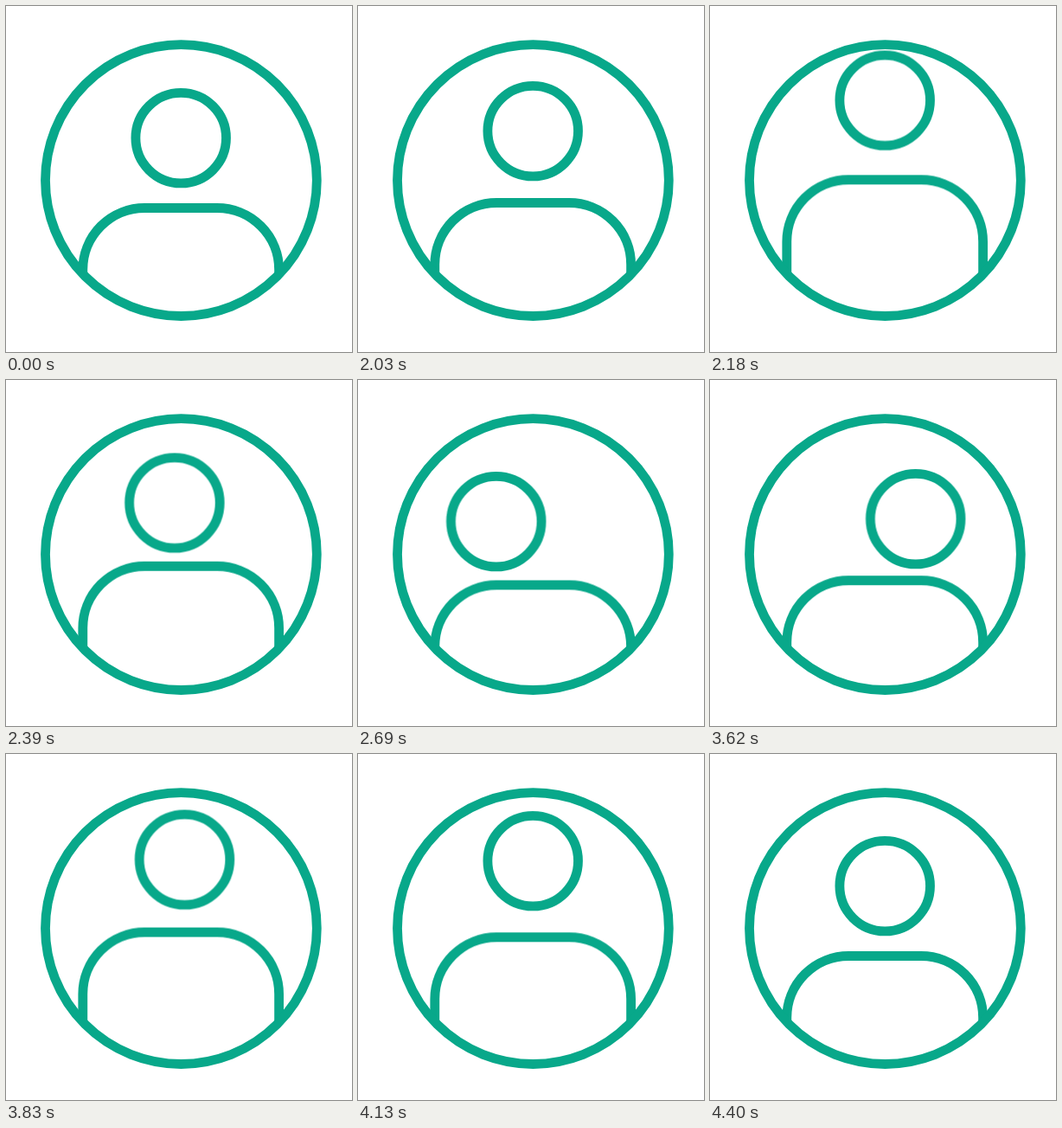
These frames come from a looping animation (400 px wide and 400 px high, 4.49 s). An HTML page:

```html
<!DOCTYPE html>
<html lang="en">
<head>
<meta charset="utf-8">
<title>Avatar</title>
<style>
  :root {
    --smooth: cubic-bezier(.333, 0, .667, 1);
    --swing: cubic-bezier(.5, 0, .5, 1);
  }
  html, body { margin: 0; width: 100%; height: 100%; overflow: hidden; background: #fff; }
  svg { display: block; width: 100%; height: 100%; }
  .line { fill: none; stroke: #08a88a; stroke-width: 10.8; }
  .head-x, .head-y, .body { animation: 4490ms linear infinite; }
  .head-x { animation-name: head-x; }
  .head-y { animation-name: head-y; }
  .body { animation-name: body; }

  /* Sideways: lean left, swing right, return to the middle */
  @keyframes head-x {
    0% { transform: translateX(0); }
    49.22% { transform: translateX(0); animation-timing-function: cubic-bezier(.53, 0, .4, 1); }
    62.58%, 66.59% { transform: translateX(-44.5px); }
    66.59% { animation-timing-function: var(--swing); }
    73.27%, 79.29% { transform: translateX(44.5px); }
    79.29% { animation-timing-function: var(--swing); }
    85.97%, 100% { transform: translateX(0); }
  }

  /* Up and down: hop, land, dip through the swing, hop back */
  @keyframes head-y {
    0% { transform: translateY(0); }
    44.54% { transform: translateY(0); animation-timing-function: var(--smooth); }
    49.22% { transform: translateY(-44px); animation-timing-function: cubic-bezier(.4, 0, .43, 1); }
    57.68% { transform: translateY(14px); animation-timing-function: ease; }
    62.58% { transform: translateY(10px); }
    66.59% { transform: translateY(10px); animation-timing-function: cubic-bezier(.5, 0, .7, 1); }
    69.93% { transform: translateY(19.6px); animation-timing-function: cubic-bezier(.3, 0, .5, 1); }
    73.27% { transform: translateY(10px); }
    79.29% { transform: translateY(10px); animation-timing-function: cubic-bezier(.4, 0, .35, 1); }
    90.31% { transform: translateY(-44px); animation-timing-function: var(--smooth); }
    98%, 100% { transform: translateY(0); }
  }

  @keyframes body {
    0% { transform: translateY(0); }
    44.54% { transform: translateY(0); animation-timing-function: var(--smooth); }
    49.22% { transform: translateY(-33px); animation-timing-function: cubic-bezier(.4, 0, .4, 1); }
    59.91% { transform: translateY(3.5px); }
    62.58% { transform: translateY(3px); }
    66.59% { transform: translateY(3px); animation-timing-function: cubic-bezier(.5, 0, .7, 1); }
    69.93% { transform: translateY(5.2px); animation-timing-function: cubic-bezier(.3, 0, .5, 1); }
    73.27% { transform: translateY(3px); }
    79.29% { transform: translateY(3px); animation-timing-function: var(--smooth); }
    90.31% { transform: translateY(-33px); animation-timing-function: var(--smooth); }
    98%, 100% { transform: translateY(0); }
  }
</style>
</head>
<body>
<svg viewBox="0 0 400 400">
  <clipPath id="inside"><circle cx="202.4" cy="201.6" r="159"/></clipPath>
  <g clip-path="url(#inside)">
    <path class="line body" d="M88.8 400V305a71.5 71.5 0 0 1 71.5-71.5H244.1a71.5 71.5 0 0 1 71.5 71.5V400"/>
  </g>
  <g class="head-x">
    <circle class="line head-y" cx="202.2" cy="152.6" r="52.3"/>
  </g>
  <circle class="line" cx="202.4" cy="201.6" r="156.9"/>
</svg>
</body>
</html>
```
